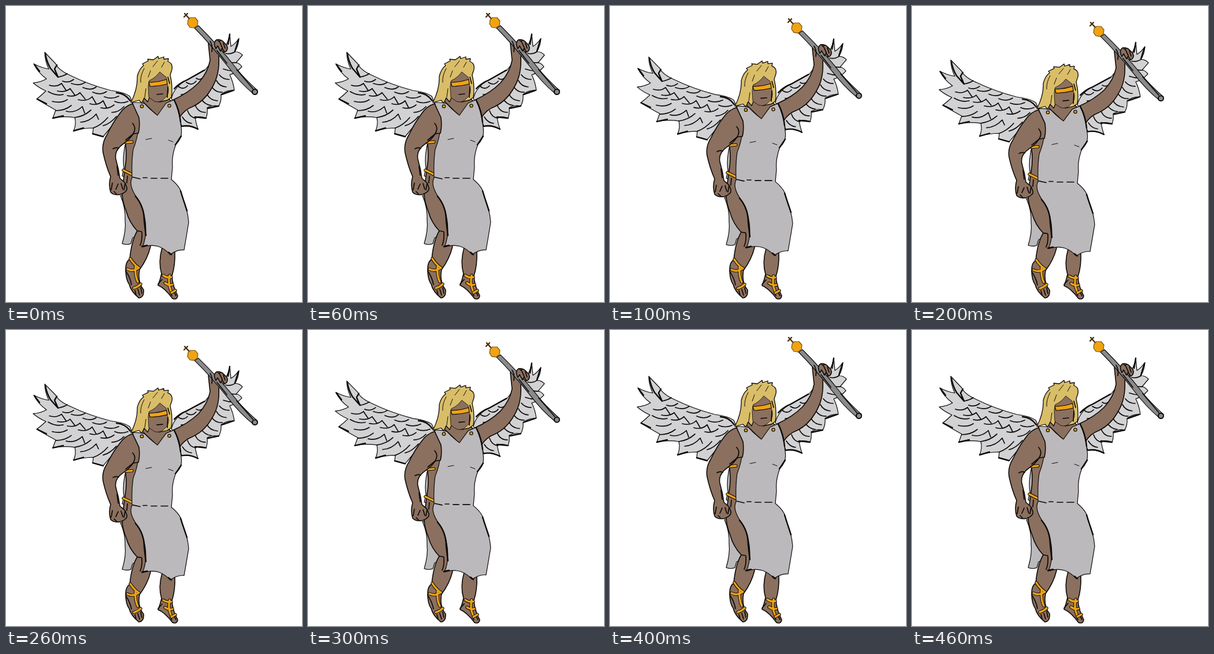
Animation, 512 px wide and 512 px high, one loop 0.5 s. Source, as an HTML page:

```html
<!DOCTYPE html>
<html lang="en">
<head>
<meta charset="utf-8">
<title>Hovering angel</title>
<style>
  html, body { margin: 0; width: 100%; height: 100%; overflow: hidden; background: #fff; }
  svg { display: block; width: 100vw; height: 100vh; }
  #angel { stroke: #0b0908; stroke-width: 1.6; stroke-linejoin: round; stroke-linecap: round; }
  .wing { fill: #d2d1d3; stroke-width: 1.2; }
  .cloth { fill: #bbb9bb; stroke-width: 1.2; }
  .skin { fill: #8b705f; }
  .hair { fill: #d9bd68; stroke-width: 1.3; }
  .gold { fill: #efa314; stroke-width: 1.2; }
  .steel { fill: #8b8a8b; stroke-width: 1.2; }
  .line { fill: none; stroke-width: 1.7; }
  .fine { fill: none; stroke-width: 1; }
  .bold { fill: none; stroke-width: 2.4; }
  .strap { fill: none; stroke: #efa314; stroke-width: 3.4; }
  .edge { fill: none; stroke-width: 5.4; }
</style>
</head>
<body>
<svg viewBox="0 0 512 512">
<defs>
  <path id="bands" d="M207 236L218 235M203 284L217 291"/>
  <path id="leftStraps" d="M215 437Q221 447 230 453M210 455Q219 460 228 454M224 450Q223 468 228 477M221 488Q228 486 233 481"/>
  <path id="rightStraps" d="M272 466Q279 471 286 469M283 466Q280 480 285 492M275 479Q282 484 288 482M286 496L293 492"/>
</defs>
<g id="angel">
  <!-- wings -->
  <path class="wing" d="M219 168L214 156Q204 149 181 146Q143 136 111 120Q91 111 86 100L67 80Q67 94 74 109Q61 107 48 100Q55 115 70 126Q60 132 47 133Q56 141 69 147Q62 154 53 161Q68 170 86 180L81 194Q100 190 119 193Q122 204 117 216Q134 211 151 211L150 221Q160 223 168 226L182 209Z"/>
  <path class="bold" d="M68 82Q70 96 77 108L90 123L84 109L88 102M191 150Q206 151 215 164M49 101L58 113M54 161L70 169M81 194L99 190M117 216L134 211M150 221L168 226"/>
  <path class="line" d="M90 123Q100 121 106 117M98 130Q108 134 117 127M113 134Q127 139 137 132M133 141Q147 147 156 140M150 149Q163 155 174 148M170 157Q183 162 195 156M188 165Q199 170 211 165M75 137Q87 141 96 134M89 147Q102 150 111 143M106 155Q119 158 128 150M125 162Q140 166 149 157M145 169Q158 173 168 164M164 176Q177 179 187 171M183 184Q195 184 204 174"/>
  <path class="line" d="M73 148Q86 156 99 153M80 165Q95 169 106 162M86 181Q102 181 113 172M104 182Q119 186 132 174M119 193Q135 191 147 180M129 201Q145 200 156 187M151 211Q165 206 176 193M168 207Q180 204 191 191M96 134L104 146M111 143L119 154M128 150L137 161M149 157L156 169M168 164L174 176M132 174L136 185M156 187L160 196"/>
  <path class="wing" d="M286 160Q291 139 313 128L344 111L366 83Q383 73 387 48L389 70Q396 66 403 56Q402 69 396 79Q404 79 409 85L398 98Q404 99 408 105Q398 116 387 119Q393 131 395 146Q382 145 372 153Q373 164 368 173Q357 171 348 176Q349 186 346 194Q335 190 327 193Q329 204 332 213Q317 206 304 208L294 175Z"/>
  <path class="bold" d="M291 143Q300 133 313 128L343 111M387 49L384 66M402 58L396 78M304 208Q318 205 332 213M346 194L327 192M368 173L349 177M393 146L373 153"/>
  <path class="line" d="M380 82Q389 84 396 79M378 95Q389 99 399 98M376 109Q387 113 397 112M369 119Q375 127 386 127M364 129Q369 139 381 140M356 140Q363 150 374 149M347 151Q352 163 366 164M337 160Q344 171 355 172M327 171Q332 184 345 184M314 181Q318 193 329 194M305 192Q311 202 321 203M298 139Q306 146 314 138M312 132Q321 139 329 130M329 125Q336 130 344 121M303 153Q312 154 318 146M321 145Q331 145 337 134"/>

  <!-- cloth behind the body -->
  <path class="cloth" d="M207 236Q201 263 204 280L201 294L218 300V222Z"/>
  <path class="cloth" d="M198 328Q207 349 206 370Q208 387 201 411Q209 414 216 411L219 401L239 392L217 325Z"/>

  <!-- legs -->
  <path class="skin" d="M228 215L206 233Q210 257 206 280L202 309Q198 331 208 355Q213 374 227 389Q217 406 214 438Q207 442 207 455Q207 473 213 481Q216 494 230 505Q239 504 238 491Q227 477 231 456Q245 437 250 416L244 356L226 299Z"/>
  <path class="skin" d="M270 418Q263 443 269 463Q267 473 263 483Q275 488 288 506Q296 509 297 501Q288 484 287 467Q293 448 292 425Z"/>
  <path class="line" d="M227 389L234 390M235 391Q236 405 232 414M207 458Q215 470 217 482M223 492L225 500M228 490L231 500M233 487L235 497M263 481L270 473M284 496L287 501M290 493L294 501M210 294L209 306"/>
  <use href="#leftStraps" class="edge"/><use href="#leftStraps" class="strap"/>
  <use href="#rightStraps" class="edge"/><use href="#rightStraps" class="strap"/>
  <use href="#bands" class="edge"/><use href="#bands" class="strap"/>

  <!-- raised arm -->
  <path class="skin" d="M288 163Q316 150 333 133Q349 115 353 94L350 65Q353 56 358 61L367 72L363 62Q366 56 371 59L382 69Q385 77 376 80L368 87Q370 118 357 140Q344 164 323 174Q309 179 300 193Z"/>
  <path class="steel" d="M326 38L333 34Q367 68 397 106Q409 122 435 146L428 152Q405 133 384 105Q354 66 326 38Z"/>
  <circle class="steel" cx="430.5" cy="148.5" r="4.5" style="stroke-width:2"/>
  <path class="line" d="M365 77L382 99M399 110L427 143"/>
  <path class="skin" d="M361 69Q359 61 365 58L369 62Q371 56 377 63L382 68Q385 77 378 80L374 73L371 78L366 69L363 74Z"/>
  <path class="line" d="M353 61Q358 68 356 79M370 63L374 72M376 64L379 73"/>
  <path class="bold" style="stroke:#4a3008" d="M309 13L318 23M308 19L314 13"/>
  <path class="gold" style="stroke:#7a5210" d="M319 20L327 20L332 26L331 34L325 38L318 37L314 31L315 24Z"/>

  <!-- neck, tunic and lowered arm -->
  <path class="skin" d="M234 163L251 153L278 158L290 168L264 192Z"/>
  <path class="cloth" d="M219 167Q229 166 240 169Q251 181 262 189Q269 179 277 168L291 162Q301 186 303 210Q306 228 294 239Q286 260 288 278L286 300Q304 315 304 328Q314 350 316 374Q312 399 308 422Q296 421 284 430Q275 420 264 416Q250 412 236 417Q246 393 239 361Q236 344 224 328Q212 309 218 297Q217 268 220 248Q228 228 229 209Z"/>
  <path class="bold" d="M291 163Q300 180 302 201M303 225Q296 236 293 240M302 320Q307 336 313 354M235 416L244 414M224 329Q239 347 239 371L242 397M281 426L286 430"/>
  <path class="line" d="M219 296L232 299M237 297L244 297M251 298L261 298M268 298L280 298"/>
  <path class="fine" d="M242 231L252 229M281 232L289 235"/>
  <path class="skin" d="M219 169Q205 173 196 187Q184 203 175 222Q165 238 168 254Q173 277 181 295Q177 309 181 322Q186 328 198 326Q211 321 209 314L206 306L197 298Q195 282 190 265Q187 250 202 239Q214 231 220 221L229 220Q232 209 230 193Z"/>
  <path class="line" d="M219 203Q226 211 220 221M185 247Q190 244 195 246M192 277L194 293M184 306L182 318M194 308L190 317M199 307L202 317M206 307L204 318M187 321L191 325M207 232L219 222"/>
  <circle class="gold" cx="235" cy="173.5" r="2.7"/>
  <circle class="gold" cx="282.5" cy="172.5" r="2.7"/>

  <!-- head -->
  <path class="hair" d="M216 167Q228 143 227 122Q230 109 238 103L236 100L246 95L245 92L255 93L263 87L264 91L273 88L273 92L281 91L280 96Q289 99 287 110L284 119Q289 140 286 158L279 163L265 166L249 156L245 166L239 159L235 168L230 163Z"/>
  <path class="skin" style="stroke-width:.8" d="M248 129Q259 124 266 114L277 123L279 136Q283 145 279 155L273 161Q266 168 257 165L247 158L246 139Z"/>
  <path class="gold" d="M247 132Q263 132 278 127L279 135Q264 139 249 139Z"/>
  <path class="line" d="M261 153L271 152M280 123L283 134M280 140L279 158"/>
  <path class="fine" d="M239 108Q232 121 233 132M262 95L254 105M274 97L269 106M242 143L240 158M250 112L246 123"/>
</g>
</svg>
<script>
  const angel = document.getElementById('angel');
  const squash = [0, 0.019, 0.0314, 0.019, 0];
  const ground = 505.5;

  // The figure sinks and rises in held steps while its feet stay in place.
  function draw() {
    const step = Math.floor(performance.now() % 500 / 100);
    const scale = 1 - squash[step];
    angel.setAttribute('transform', `matrix(1 0 0 ${scale} 0 ${ground * (1 - scale)})`);
    requestAnimationFrame(draw);
  }
  draw();
</script>
</body>
</html>
```
